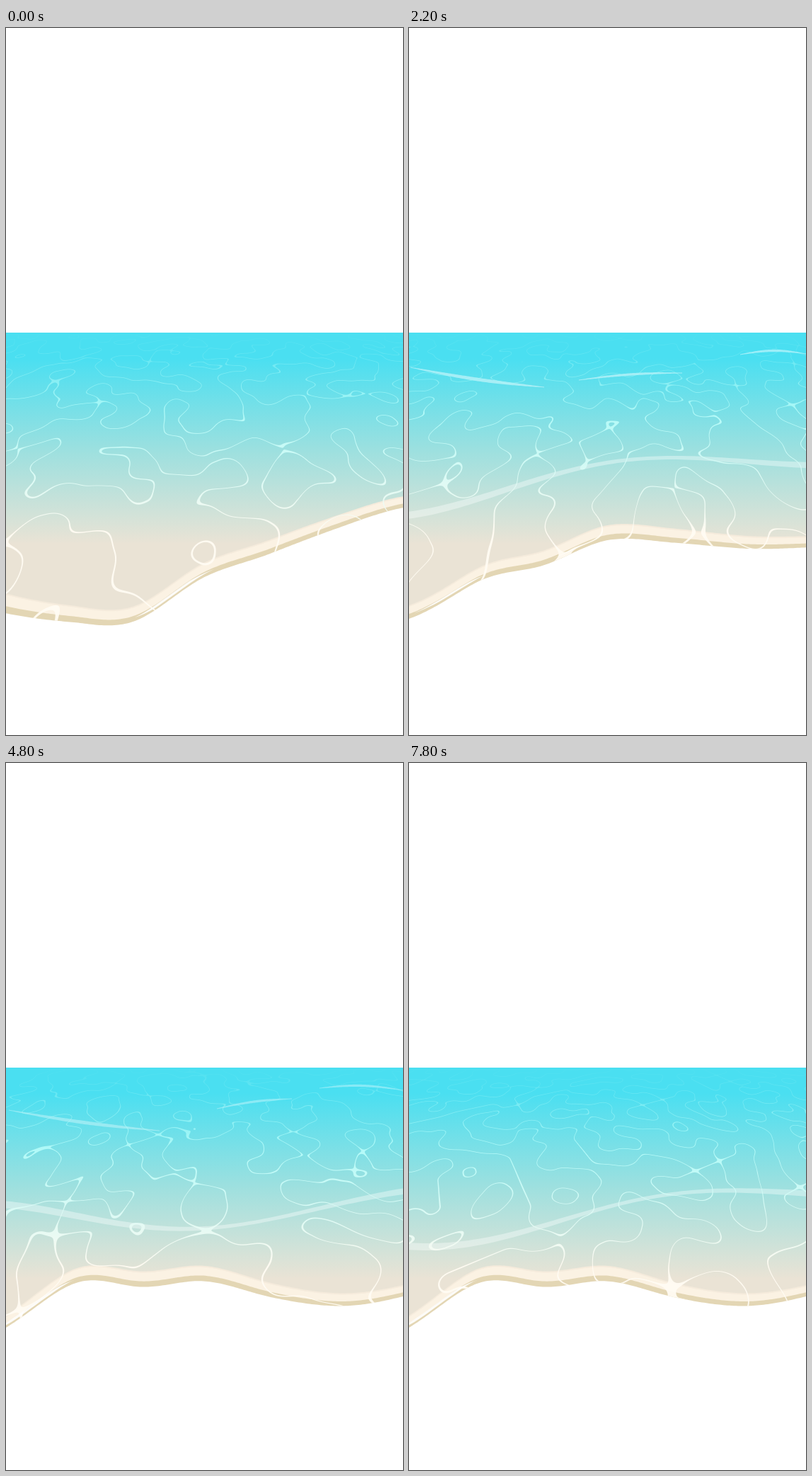
Recreate the animation shown at these times as an HTML page with a canvas. Size 561 px wide and 998 px high, loop 8 s.

```html
<!DOCTYPE html>
<html lang="en">
<head>
<meta charset="utf-8">
<title>Beach waves</title>
<style>
html, body { margin: 0; width: 100%; height: 100%; overflow: hidden; background: #fff; }
canvas { display: block; }
</style>
</head>
<body>
<canvas id="stage" width="561" height="998"></canvas>
<script>
const W = 561, H = 998, TOP = 430, SEA_H = 430, TAU = 2 * Math.PI;
const LOOP = 8000, STEP = 200;
const ctx = document.getElementById('stage').getContext('2d');

const clamp = v => v < 0 ? 0 : v > 1 ? 1 : v;
const lerp = (a, b, k) => a + (b - a) * k;
const white = a => `rgba(255,255,255,${a})`;

// Smooth curve through evenly spaced values, u from 0 to 1
function spline(v, u) {
  const n = v.length - 1, f = u * n, i = Math.min(n - 1, Math.floor(f)), k = f - i;
  const b = v[i], c = v[i + 1];
  const a = i ? v[i - 1] : 2 * b - c, d = i < n - 1 ? v[i + 2] : 2 * c - b;
  return b + .5 * k * (c - a + k * (2 * a - 5 * b + 4 * c - d + k * (3 * (b - c) + d - a)));
}

// Shore: a wave running to the right along the resting coast line
const COAST = [797, 778, 791, 764, 760, 744, 714];
const shorePhase = (x, ms) => TAU * ((ms + 450) / 3000 - x / 786);
function shore(x, ms) {
  const reach = 40 + 22 * Math.exp(-(((x - 100) / 110) ** 2));
  return spline(COAST, x / W) + reach * Math.cos(shorePhase(x, ms));
}

// Width of the foam and wet sand together
function bandWidth(x, ms) {
  const u = x / W;
  return 23 - 7 * u * u + 6 * (1 - u) ** 3 * Math.sin(shorePhase(x, ms));
}

// Seeded gradient noise
let seed = 7193;
const rand = () => (seed = (seed * 16807) % 2147483647) / 2147483647;
const perm = new Uint8Array(512);
for (let i = 0; i < 256; i++) perm[i] = i;
for (let i = 255; i > 0; i--) {
  const j = Math.floor(rand() * (i + 1)), v = perm[i];
  perm[i] = perm[j];
  perm[j] = v;
}
for (let i = 0; i < 256; i++) perm[i + 256] = perm[i];

const fade = t => t * t * t * (t * (t * 6 - 15) + 10);
function grad(h, x, y, z) {
  h &= 15;
  const u = h < 8 ? x : y, v = h < 4 ? y : h === 12 || h === 14 ? x : z;
  return (h & 1 ? -u : u) + (h & 2 ? -v : v);
}
function noise(x, y, z) {
  const fx = Math.floor(x), fy = Math.floor(y), fz = Math.floor(z);
  const X = fx & 255, Y = fy & 255, Z = fz & 255;
  x -= fx; y -= fy; z -= fz;
  const u = fade(x), v = fade(y), w = fade(z);
  const A = perm[X] + Y, B = perm[X + 1] + Y;
  const a0 = perm[A] + Z, a1 = perm[A + 1] + Z, b0 = perm[B] + Z, b1 = perm[B + 1] + Z;
  const layer = (k, dz) => lerp(
    lerp(grad(perm[a0 + k], x, y, dz), grad(perm[b0 + k], x - 1, y, dz), u),
    lerp(grad(perm[a1 + k], x, y - 1, dz), grad(perm[b1 + k], x - 1, y - 1, dz), u), v);
  return lerp(layer(0, z), layer(1, z - 1), w);
}

// Light net on the water: zero lines of the noise, seen in perspective
const net = document.createElement('canvas');
net.width = W;
net.height = SEA_H;
const netCtx = net.getContext('2d');
const img = netCtx.createImageData(W, SEA_H);
const BW = W + 2, field = new Float32Array(BW * (SEA_H + 2));
const C = Math.cos(.5), S = Math.sin(.5);

function drawNet(ms) {
  const z = ms * .0015 + .37;
  for (let y = 0, i = 0; y < SEA_H + 2; y++) {
    const depth = y + TOP - 251, v = 60 - 3333 / depth;
    for (let x = 0; x < BW; x++) {
      const u = (x - 280) / (.15 * depth) + 40;
      field[i++] = noise(u * C - v * S, u * S + v * C, z);
    }
  }
  const px = img.data;
  for (let y = 0, o = 0; y < SEA_H; y++) {
    const low = clamp((y - 90) / 190), alpha = .95 * clamp((y + 2) / 120);
    const r = lerp(170, 255, low), b = lerp(250, 242, low);
    for (let x = 0; x < W; x++, o += 4) {
      const i = (y + 1) * BW + x + 1, n = field[i];
      const gx = field[i + 1] - field[i - 1], gy = field[i + BW] - field[i - BW];
      const slope = Math.sqrt(gx * gx + gy * gy) / 2 + 1e-5;
      const w = Math.max(.014, .38 * slope);
      const cover = clamp((w - n) / slope + .5) - clamp((-w - n) / slope + .5);
      px[o] = r;
      px[o + 1] = 251;
      px[o + 2] = b;
      px[o + 3] = 255 * cover * alpha;
    }
  }
  netCtx.putImageData(img, 0, 0);
}

const sea = ctx.createLinearGradient(0, 466, 0, 728);
sea.addColorStop(0, '#4adff1');
sea.addColorStop(.5, '#9de0df');
sea.addColorStop(1, '#eae3d5');

// Everything between the horizon and the curve edge(x)
function areaAbove(edge) {
  ctx.beginPath();
  ctx.moveTo(0, TOP);
  for (let x = 0; x <= W; x += 3) ctx.lineTo(x, edge(x));
  ctx.lineTo(W, TOP);
  ctx.closePath();
}

function fillAbove(edge, color) {
  areaAbove(edge);
  ctx.fillStyle = color;
  ctx.fill();
}

function clipAbove(edge, paint) {
  ctx.save();
  areaAbove(edge);
  ctx.clip();
  paint();
  ctx.restore();
}

// Band along a curve; at(u) gives [x, y, thickness]
function ribbon(at, color) {
  const pts = Array.from({ length: 81 }, (_, i) => at(i / 80));
  ctx.beginPath();
  for (const [x, y, h] of pts) ctx.lineTo(x, y - h / 2);
  for (const [x, y, h] of pts.reverse()) ctx.lineTo(x, y + h / 2);
  ctx.closePath();
  ctx.fillStyle = color;
  ctx.fill();
}

// Long swell running to the right, fading in and out once per cycle
function drawSwell(ms) {
  const cycle = (ms % 1800) / 1800;
  ribbon(u => {
    const x = u * W;
    const y = 654 - 41 * u + (34 - 20 * u) * Math.cos(TAU * (ms - 430 - 2.5 * x) / 1800);
    return [x, y, 7.5 + 2.5 * Math.cos(x / 110)];
  }, white(.36 * clamp(2 * Math.sin(Math.PI * cycle))));
}

// Far streaks: both ends, how far each drifts, bow and thickness
const FAR = [
  { from: [2, 479], to: [191, 507], d0: [-2, -11], d1: [-26, -12], bow: 3, h: 4 },
  { from: [240, 497], to: [386, 487], d0: [-58, 9], d1: [-18, 13], bow: -3, h: 2.5 },
  { from: [468, 461], to: [561, 460], d0: [25, 2], d1: [0, -2], bow: -5, h: 2.5 }
];
function drawFar(ms) {
  const k = (ms % 900 - 400) / 100, alpha = .45 * clamp(1 - k * k / 4);
  for (const { from, to, d0, d1, bow, h } of FAR) {
    ribbon(u => {
      const arc = Math.sin(Math.PI * u);
      const [x, y] = [0, 1].map(i => lerp(from[i] + d0[i] * k, to[i] + d1[i] * k, u));
      return [x, y + bow * arc, .8 + h * arc];
    }, white(alpha));
  }
}

function draw(ms) {
  const edge = x => shore(x, ms);
  const foam = x => edge(x) - bandWidth(x, ms);

  ctx.fillStyle = '#fff';
  ctx.fillRect(0, 0, W, H);
  fillAbove(edge, '#e3d6b4');
  fillAbove(x => lerp(edge(x), foam(x), .36), '#fbf2e3');
  fillAbove(x => foam(x) + 2, '#f5ebdc');
  fillAbove(foam, sea);

  clipAbove(foam, () => {
    drawSwell(ms);
    drawFar(ms);
  });
  drawNet(ms);
  clipAbove(edge, () => {
    ctx.drawImage(net, 0, TOP);
    // Wet sheen where the shore climbs steeply
    ribbon(u => {
      const x = u * W, climb = edge(x) - edge(Math.min(W, x + 1));
      return [x, edge(x) - 5, 4 * clamp((climb - .42) * 4)];
    }, white(.9));
  });
}

let last = -1;
function tick() {
  const ms = Math.floor(performance.now() % LOOP / STEP) * STEP;
  if (ms !== last) draw(last = ms);
  requestAnimationFrame(tick);
}
tick();
</script>
</body>
</html>
```
